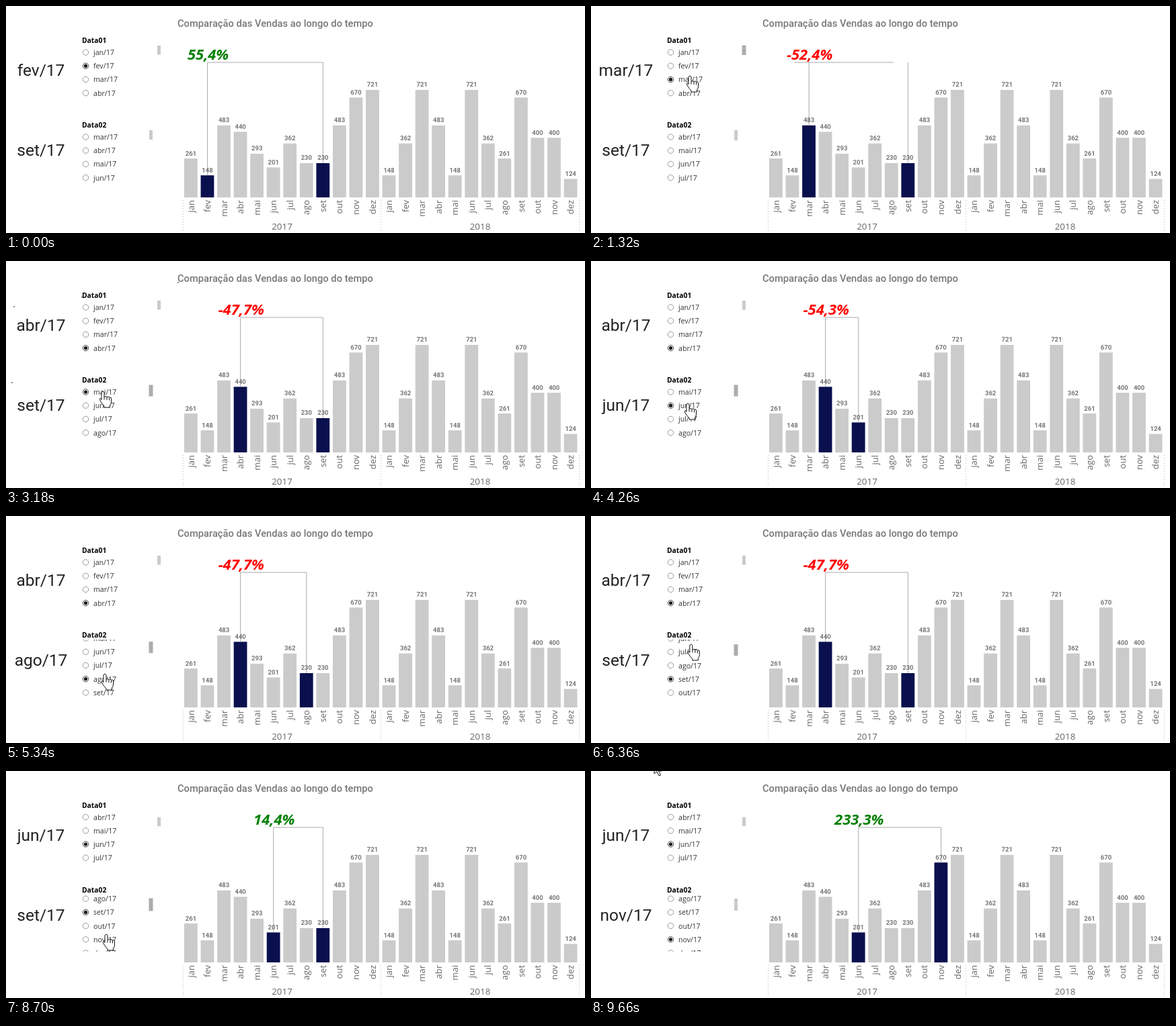
Write an HTML page that moves like this. It is 861x338 px and loops after 9780 ms.

```html
<!DOCTYPE html>
<html lang="pt">
<head>
<meta charset="utf-8">
<title>Vendas</title>
<style>
html, body { margin: 0; width: 100%; height: 100%; overflow: hidden; background: #fff; }
svg { display: block; }
.din { font-family: Roboto, sans-serif; }
.sans { font-family: "Open Sans", "Noto Sans", sans-serif; }
.title { font-size: 14.7px; font-weight: 500; fill: #777; }
.big { font-size: 24.5px; fill: #222; text-anchor: middle; }
.value { font-size: 9.5px; font-weight: 700; fill: #777; text-anchor: middle; }
.month { font-size: 13px; fill: #666; text-anchor: end; }
.year { font-size: 13.4px; fill: #666; text-anchor: middle; }
.head { font-size: 10.3px; font-weight: 700; }
.item { font-size: 10.6px; fill: #333; }
.pct { font-size: 22px; font-weight: 700; font-style: italic; text-anchor: middle; }
</style>
</head>
<body>
<svg id="stage" width="861" height="338"></svg>
<script>
const LOOP = 9780, TICK = 60, BASE = 285, ROW = 20.2, LINE_Y = 84;
const months = 'jan fev mar abr mai jun jul ago set out nov dez'.split(' ');
const sales = [261, 148, 483, 440, 293, 201, 362, 230, 230, 483, 670, 721,
               148, 362, 721, 483, 148, 721, 362, 261, 670, 400, 400, 124];

// click time, time the visuals refresh, first month, second month
const steps = [
  [-1e4, -1e4, 1, 8], [1200, 1260, 2, 8], [2220, 2340, 3, 8], [3180, 3300, 3, 4],
  [4080, 4200, 3, 5], [5160, 5280, 3, 7], [6000, 6120, 3, 8], [7020, 7200, 4, 8],
  [7800, 7920, 5, 8], [8820, 8940, 5, 10]
];
const cursorKeys = [
  [300, 98, -30], [840, 147, 104], [1560, 147, 104], [1920, 148, 126], [2400, 148, 126],
  [2940, 144, 194], [3540, 144, 194], [3840, 144, 212], [4500, 144, 212], [4980, 147, 235],
  [6180, 147, 235], [6600, 152, 115], [6900, 152, 115], [7260, 154, 125], [7500, 152, 128],
  [8220, 152, 128], [8460, 149, 243], [9240, 149, 243], [9660, 94, -12]
];
const scroll1Keys = [[0, 0], [6660, 0], [6840, 35.6], [8040, 35.6], [8220, 61]];
const scroll2Keys = [[0, 0], [4500, 0], [4980, 13], [5640, 13], [5760, 33],
                     [7140, 33], [7200, 0], [8520, 0], [8640, 25]];
const spinners = [[9, 68], [6, 181], [110, 54], [253, 32]];

const HAND = 'M-2 1.5q2-3 4 0v7q2-2 4 0q2-1.5 3.5 .5q3-1 3 2v5q0 3-2 5v3h-8.500v-2q-3-3-6-8' +
             'q-1.500-3 0-3.500q1.500 0 2 2zM2 8.500v4M6 9v4M9.500 9.500v4';
const ARROW = 'M0 0v16l4-3 3 6 2.500-1-3-6h5z';

const clamp = p => Math.max(0, Math.min(1, p));
const ease = p => p < .5 ? 2 * p * p : 1 - 2 * (1 - p) ** 2;
const barX = i => 265 + 24.55 * i;
const mid = i => barX(i) + 10;
const barTop = i => BASE - sales[i] * .222;
const dateName = i => months[i % 12] + '/' + (17 + Math.floor(i / 12));

const text = (cls, x, y, s, more = '') => `<text class="${cls}" x="${x}" y="${y}" ${more}>${s}</text>`;
const rect = (x, y, w, h, fill) => `<rect x="${x}" y="${y}" width="${w}" height="${h}" fill="${fill}"/>`;
const path = (d, stroke, more = '') => `<path d="${d}" fill="none" stroke="${stroke}" ${more}/>`;

function track(keys, t) {
  const n = keys.findIndex(k => k[0] > t);
  if (n < 0) return keys[keys.length - 1].slice(1);
  if (n === 0) return keys[0].slice(1);
  const a = keys[n - 1], b = keys[n], p = ease((t - a[0]) / (b[0] - a[0]));
  return a.slice(1).map((v, i) => v + (b[i + 1] - v) * p);
}

function chart(first, second, shift) {
  let s = text('din title', 255, 31, 'Comparação das Vendas ao longo do tempo');
  const x1 = mid(first), x2 = mid(second);
  sales.forEach((v, i) => {
    s += rect(barX(i), barTop(i), 19.8, BASE - barTop(i), i === first || i === second ? '#09104d' : '#cbcbcb');
    s += text('sans month', 0, 0, months[i % 12], `transform="translate(${mid(i) + 4.5} 289) rotate(-90)"`);
  });
  s += path(`M${x1} ${LINE_Y}V${barTop(first)}M${x2} ${LINE_Y}V${barTop(second)}` +
            `M${x1 + shift} ${LINE_Y}H${x2 + shift}`, '#aaa');
  sales.forEach((v, i) => s += text('din value', mid(i), barTop(i) - 4.5, v));
  s += path('M263.500 289V337M557.500 289V337M852.500 289V337', '#bbb', 'stroke-dasharray="1 3"');
  s += text('sans year', 410.5, 333, 2017) + text('sans year', 705, 333, 2018);
  const pct = (sales[second] / sales[first] - 1) * 100;
  return s + text('sans pct', x1 + 1, 79.5, pct.toFixed(1).replace('.', ',') + '%',
                  `fill="${pct < 0 ? '#f00' : '#008000'}"`);
}

function slicer(title, y, clipY, clipH, start, picked, offset) {
  let s = '';
  for (let i = start; i < 24; i++) {
    const cy = y + ROW * (i - start) - offset, on = i === picked;
    if (cy < clipY - 9 || cy > clipY + clipH + 9) continue;
    s += `<circle cx="118.500" cy="${cy}" r="4.200" fill="#fff" stroke="${on ? '#444' : '#999'}"/>`;
    if (on) s += `<circle cx="118.500" cy="${cy}" r="2.600" fill="#181818"/>`;
    s += text('sans item', 130, cy + 4, dateName(i));
  }
  return text('sans head', 113, y - 14.5, title) +
    `<svg y="${clipY}" width="861" height="${clipH}" viewBox="0 ${clipY} 861 ${clipH}">${s}</svg>`;
}

function thumb(x, y, h, hover) {
  return hover ? rect(x - .5, y - .5, 6, h + 1, '#acacac') : rect(x, y, 5, h, '#cbcbcb');
}

function pointer(x, y, hand) {
  return `<path transform="translate(${x} ${y})" d="${hand ? HAND : ARROW}" fill="#fff" stroke="#111" stroke-linejoin="round"/>`;
}

function render(t) {
  const clicked = steps.filter(k => k[0] <= t).pop();
  const n = steps.filter(k => k[1] <= t).length - 1;
  const [, updated, first, second] = steps[n];
  const before = n ? steps[n - 1][2] : first;
  const shift = (mid(before) - mid(first)) * (1 - ease(clamp((t - updated) / 240)));
  const [cx, cy] = track(cursorKeys, t);
  const [off1] = track(scroll1Keys, t), [off2] = track(scroll2Keys, t);
  const inside = t >= 300 && cx > 110;
  const over1 = inside && cy > 60 && cy < 143, over2 = inside && cy > 184 && cy < 269;

  let s = chart(first, second, shift);
  s += text('din big', 52, 104, dateName(first)) + text('din big', 52, 223, dateName(second));
  s += slicer('Data01', 69, 60, 83, 0, clicked[2], off1);
  s += slicer('Data02', 195, 184, 85, first + 1, clicked[3], off2);
  s += thumb(225, 59 + off1 * .16, 13.5, over1);
  s += thumb(213, 185 + off2 * .2, 14 + (first - 1), over2);
  if (t < clicked[1]) {
    const a = (t - clicked[0]) / 100;
    for (const [x, y] of spinners)
      s += `<circle cx="${x + 3 * Math.cos(a)}" cy="${y + 3 * Math.sin(a)}" r=".9" fill="#555"/>`;
  }
  if (t >= 300) s += pointer(cx, cy, over1 || over2);
  return s;
}

const stage = document.getElementById('stage');
const began = performance.now();
let last = -1;
function frame() {
  const t = Math.floor((performance.now() - began) % LOOP / TICK) * TICK;
  if (t !== last) stage.innerHTML = render(last = t);
  requestAnimationFrame(frame);
}
frame();
</script>
</body>
</html>
```
